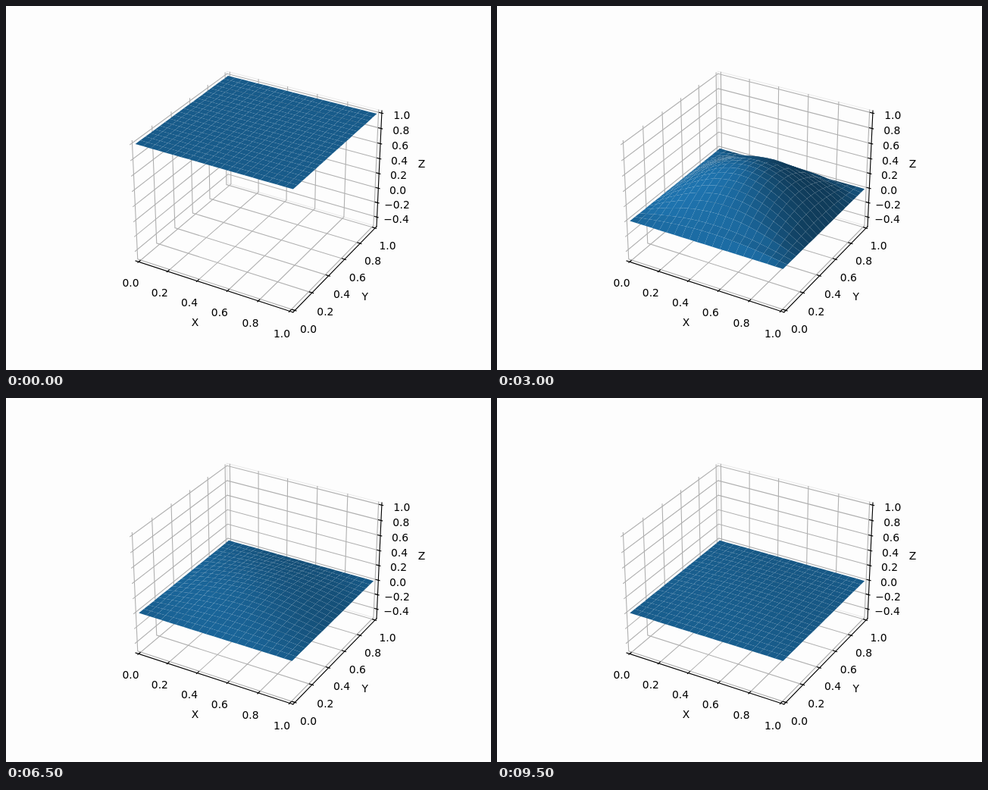
Write an HTML page with a canvas that moves like this. It is 640 px wide and 480 px high and loops after 10 s.

```html
<!DOCTYPE html>
<html lang="en">
<head>
<meta charset="utf-8">
<title>Cooling plate</title>
<style>
  html, body { margin: 0; width: 100%; height: 100%; overflow: hidden; background: #fdfdfd; }
  svg, canvas { position: absolute; left: 0; top: 0; width: 640px; height: 480px; }
  text { font: 13.889px "DejaVu Sans", sans-serif; text-anchor: middle; }
  path { fill: none; stroke-width: 1.11; stroke-linecap: square; }
  .pane { stroke: #ebebeb; }
  .grid { stroke: #b0b0b0; }
  .axis { stroke: #000; }
</style>
</head>
<body>
<svg id="axes" viewBox="0 0 640 480"></svg>
<canvas id="plot" width="640" height="480"></canvas>
<script>
const STEP_MS = 500, STEPS = 20;
const CELLS = 20, H = 1 / CELLS, DT = 0.01;
const LO = -1 / 48, HI = 1 + 1 / 48;

// Perspective camera: elevation 30, azimuth -60, distance 10.
const C = Math.sqrt(3) / 2;
function project([fx, fy, fz]) {
  const x = (fx - 0.5) * 8 / 7, y = (fy - 0.5) * 8 / 7, z = (fz - 0.5) * 6 / 7;
  const right = C * x + 0.5 * y;
  const up = -0.25 * x + C / 2 * y + C * z;
  const depth = 10 - (C / 2 * x - 0.75 * y + 0.5 * z);
  const k = 369.6 / 0.185 / depth;
  return [332.995 + right * k, 237.41 - up * k, depth];
}
const zFrac = z => (z + 0.5) / 1.5;

// ---- Axes ----
const svg = document.getElementById("axes");
function add(tag, attrs, content) {
  const el = document.createElementNS("http://www.w3.org/2000/svg", tag);
  for (const k in attrs) el.setAttribute(k, attrs[k]);
  if (content) el.textContent = content;
  svg.append(el);
}
function line(cls, ...pts) {
  const d = pts.map(p => project(p).slice(0, 2).map(v => v.toFixed(2)).join(" "));
  add("path", { class: cls, d: "M" + d.join("L") });
}
function label(str, p, dy) {
  const [x, y] = project(p);
  add("text", { x: x.toFixed(1), y: Math.round(y + dy) }, str);
}
const tickText = v => v.toFixed(1).replace("-", "\u2212");
const OUT = 0.1 / 12, IN = 0.2 / 12;
const PAD = 0.0864, TITLE_PAD = 0.1879;

function buildAxes() {
  line("pane", [LO, HI, LO], [HI, HI, LO], [HI, HI, HI], [LO, HI, HI], [LO, HI, LO]);
  const fifths = [0, 1, 2, 3, 4, 5].map(i => i / 5);
  const heights = [-2, -1, 0, 1, 2, 3, 4, 5].map(i => i / 5);

  for (const v of fifths) {
    line("grid", [v, LO, LO], [v, HI, LO], [v, HI, HI]);
    line("grid", [HI, v, LO], [LO, v, LO], [LO, v, HI]);
  }
  for (const v of heights) {
    const f = zFrac(v);
    line("grid", [LO, LO, f], [LO, HI, f], [HI, HI, f]);
  }

  line("axis", [LO, LO, LO], [HI, LO, LO]);
  line("axis", [HI, LO, LO], [HI, HI, LO]);
  line("axis", [HI, HI, LO], [HI, HI, HI]);

  for (const v of fifths) {
    line("axis", [v, LO - OUT, LO], [v, LO + IN, LO]);
    line("axis", [HI + OUT, v, LO], [HI - IN, v, LO]);
    label(tickText(v), [v, LO - PAD, LO - PAD], 11);
    label(tickText(v), [HI + PAD, v, LO - PAD], 11);
  }
  for (const v of heights) {
    const f = zFrac(v);
    line("axis", [HI + OUT, HI, f], [HI - IN, HI, f]);
    label(tickText(v), [HI + PAD, HI + PAD, f], 11);
  }
  const a = LO - TITLE_PAD, b = HI + TITLE_PAD;
  label("X", [0.5, a, a], 4);
  label("Y", [b, 0.5, a], 4);
  label("Z", [b, b, 0.5], 4);
}

// ---- Heat flow, alternating implicit half steps in y and x ----
const R = DT / 2 / (H * H);

function implicit(f) {
  const u = new Array(CELLS + 1).fill(0), c = [0], d = [0];
  for (let i = 1; i < CELLS; i++) {
    const m = 1 + 2 * R - R * c[i - 1];
    c[i] = R / m;
    d[i] = (f[i] + R * d[i - 1]) / m;
  }
  for (let i = CELLS - 1; i > 0; i--) u[i] = d[i] + c[i] * u[i + 1];
  return u;
}
const explicit = u => u.map((v, i) =>
  i % CELLS ? v + R * (u[i - 1] - 2 * v + u[i + 1]) : 0);

// The field stays a product of one profile along x and one along y.
const ones = new Array(CELLS + 1).fill(1);
const states = [{ px: ones, py: ones }];
while (states.length < STEPS) {
  const px = implicit(states[states.length - 1].py);
  states.push({ px, py: explicit(px) });
}

// ---- Surface ----
const ctx = document.getElementById("plot").getContext("2d");

function shade(a, b) {
  const dot = (-2 * a - 2 * b + 1) / 3 / Math.hypot(a, b, 1);
  const k = 0.3 + 0.35 * (dot + 1);
  return `rgb(${[31, 119, 180].map(v => Math.round(v * k))})`;
}

function drawSurface({ px, py }) {
  const height = (i, j) => px[i] * py[j];
  const corner = (i, j) => project([i * H, j * H, zFrac(height(i, j))]);
  const faces = [];
  for (let j = 0; j < CELLS; j++) {
    for (let i = 0; i < CELLS; i++) {
      const pts = [corner(i, j), corner(i + 1, j), corner(i + 1, j + 1), corner(i, j + 1)];
      const a = (height(i, j) - height(i + 1, j)) / H;
      const b = (height(i + 1, j) - height(i + 1, j + 1)) / H;
      const depth = pts.reduce((s, p) => s - 1 / p[2], 0);
      faces.push({ pts, depth, fill: shade(a, b) });
    }
  }
  faces.sort((p, q) => q.depth - p.depth);

  ctx.clearRect(0, 0, 640, 480);
  for (const { pts, fill } of faces) {
    ctx.fillStyle = fill;
    ctx.beginPath();
    for (const [x, y] of pts) ctx.lineTo(x, y);
    ctx.closePath();
    ctx.fill();
  }
}

let shown = -1;
const start = performance.now();
function tick() {
  const t = Math.max(0, performance.now() - start);
  const step = Math.floor(t / STEP_MS) % STEPS;
  if (step !== shown) {
    shown = step;
    drawSurface(states[step]);
  }
  requestAnimationFrame(tick);
}
buildAxes();
tick();
</script>
</body>
</html>
```
